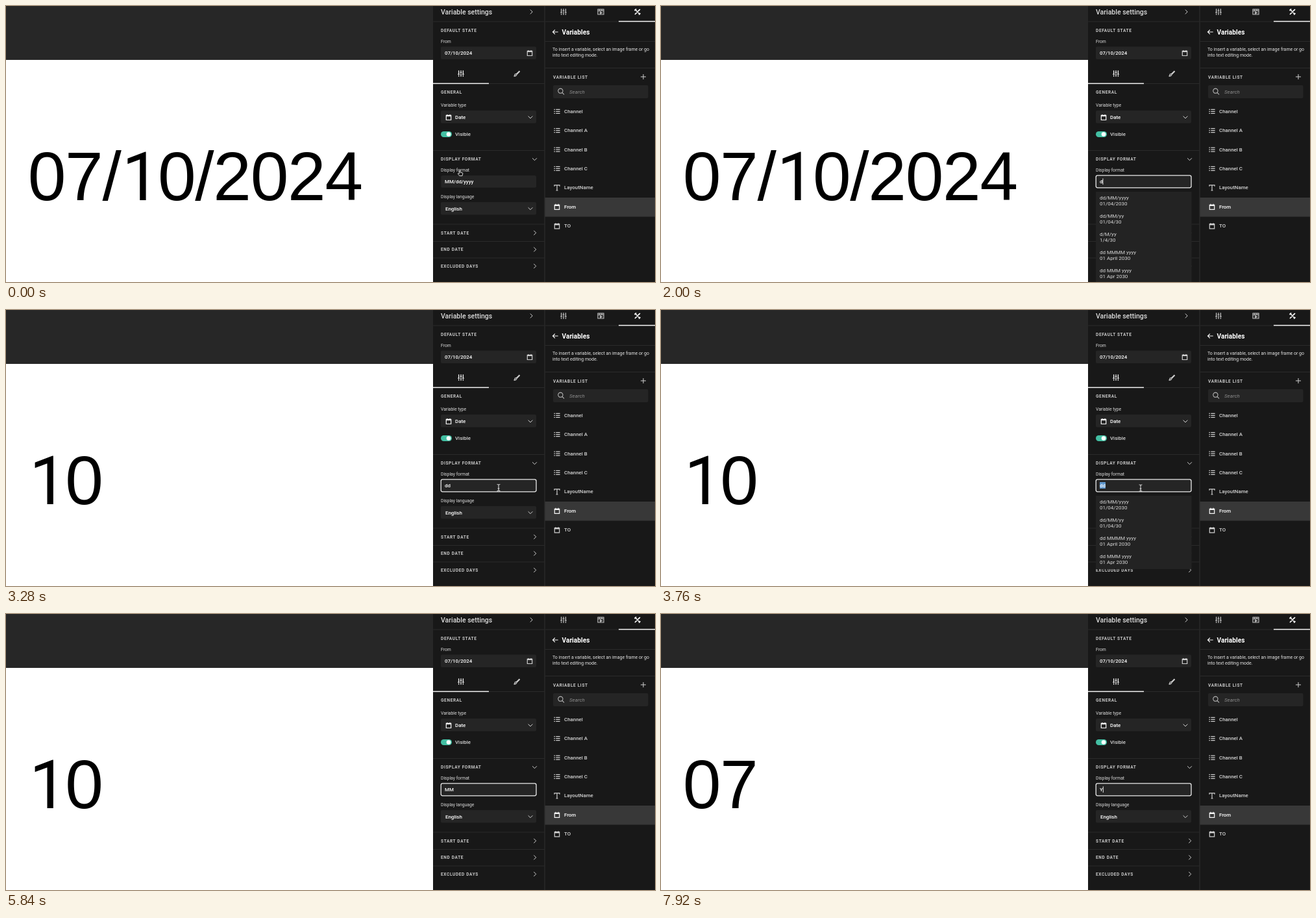
An HTML page that plays this animation: 1000x425 px, repeating every 8000 ms.

```html
<!DOCTYPE html>
<html lang="en">
<head>
<meta charset="utf-8">
<title>Variable settings</title>
<style>
html, body { margin: 0; width: 100%; height: 100%; overflow: hidden; background: #181818; }
svg { display: block; width: 100%; height: 100%; }
text { font: 8px Roboto, sans-serif; fill: #dcdcdc; white-space: pre; }
.head { font-size: 6.5px; font-weight: 700; letter-spacing: .65px; fill: #c8c8c8; }
.label { font-size: 6.8px; }
.note { font-size: 7px; fill: #e6e6e6; }
.item { font-size: 7.9px; font-weight: 500; fill: #d4d4d4; }
.value { font-size: 7.9px; font-weight: 500; fill: #fff; }
.title { font-size: 10.5px; font-weight: 500; }
.strong { font-size: 10.2px; font-weight: 700; fill: #fff; }
.hint { font-style: italic; fill: #8c8c8c; }
.page { font: 105.5px "Liberation Sans", Arial, sans-serif; letter-spacing: -1.3px; fill: #000; }
.one { font: 103.5px Roboto, sans-serif; }
</style>
</head>
<body>
<svg id="stage" viewBox="0 0 1000 425"></svg>
<script>
const LOOP = 8000, STEP = 80;
const stage = document.getElementById('stage');
let layer = stage;

function add(tag, attrs, content) {
  const el = document.createElementNS('http://www.w3.org/2000/svg', tag);
  for (const k in attrs) el.setAttribute(k, attrs[k]);
  if (content !== undefined) el.textContent = content;
  return layer.appendChild(el);
}
const rect = (x, y, width, height, fill, rx = 0) => add('rect', { x, y, width, height, fill, rx });
const text = (x, y, str, cls = '') => add('text', { x, y, class: cls }, str);
const icon = (x, y, d, stroke = '#d0d0d0', width = 1) =>
  add('path', { d, transform: `translate(${x} ${y})`, fill: 'none', stroke, 'stroke-width': width });
const group = () => { layer = stage; return layer = add('g', {}); };
const show = (el, on) => el.setAttribute('visibility', on ? 'visible' : 'hidden');

const right = (x, y) => icon(x, y, 'M-1.7-3.4 1.7 0-1.7 3.4', '#d0d0d0');
const down = (x, y) => icon(x, y, 'M-3.4-1.7 0 1.7 3.4-1.7', '#d0d0d0');
const sliders = (x, y, color) =>
  icon(x, y, 'M-3.4-4.8V.6M-3.4 2.4V4.8M0-4.8V-2.4M0-.6V4.8M3.4-4.8V.6M3.4 2.4V4.8M-4.8 1.2H-2M-1.4-1.6H1.4M2 1.2H4.8', color, 1.3);
const calendar = (x, y, color) =>
  icon(x, y, 'M-3.7-3.2H3.7V4H-3.7ZM-3.7-2H3.7M-2-4.6V-3M2-4.6V-3', color, 1.2);
const list = (x, y) =>
  icon(x, y, 'M-4.6-3H-3M-4.6 0H-3M-4.6 3H-3M-1.7-3H4.6M-1.7 0H4.6M-1.7 3H4.6', '#d0d0d0', 1.2);
const field = (y, h = 19.5) => rect(670, y, 147, h, '#252525', 2);

// Page
rect(0, 0, 658, 83, '#272727');
rect(0, 83, 658, 342, '#fff');
const page = text(33.7, 299, '', 'page');

// Settings panel
rect(658, 0, 342, 425, '#181818');
for (const y of [23.5, 119, 222, 335.5, 362, 387.5]) rect(658, y, 171.5, 1, '#2b2b2b');
text(670, 12.8, 'Variable settings', 'title');
right(809.5, 9);
text(670, 39.8, 'DEFAULT STATE', 'head');
text(670, 57, 'From', 'label');
field(62.5);
text(676, 75.2, '07/10/2024', 'value');
calendar(807, 72.5, '#d0d0d0');
sliders(701, 104, '#f0f0f0');
icon(787, 104, 'M4.2-4.2-1 1M4.8-3.5-.2 1.5M-1.2 .6Q-3.5 .8-3 2.8-3.4 3.8-4.5 4-1 4.6 0 1.8', '#d0d0d0', 1.2);
rect(658, 118.6, 86, 1.5, '#f2f2f2');
text(670, 134.6, 'GENERAL', 'head');
text(670, 155.2, 'Variable type', 'label');
field(161);
calendar(682, 171.5, '#f8f8f8');
text(692, 174, 'Date', 'value');
down(808, 171.3);
rect(670, 193, 17, 9, '#43bfa3', 4.5);
add('circle', { cx: 682, cy: 197.5, r: 3.3, fill: '#fff' });
text(692, 200.4, 'Visible', 'item');
text(670, 238, 'DISPLAY FORMAT', 'head');
down(814.5, 236);
text(670, 255, 'Display format', 'label');
text(670, 296, 'Display language', 'label');
field(302);
text(677, 314.8, 'English', 'value');
down(808, 312);
['START DATE', 'END DATE', 'EXCLUDED DAYS'].forEach((name, i) => {
  text(670, 351.7 + i * 25.6, name, 'head');
  right(815, 349.3 + i * 25.6);
});

// Variables panel
rect(829.5, 0, 1, 425, '#303030');
for (const y of [23.5, 54, 95]) rect(830.5, y, 169.5, 1, '#2b2b2b');
sliders(859, 9, '#c0c0c0');
icon(916.5, 9, 'M-4.5-3.8H4.5V4H-4.5ZM-4.5-1.5H4.5M-2-3.8-1.4-1.5M1.2-3.8 1.8-1.5M-1 0 1.8 1.4-1 2.8Z', '#c0c0c0', 1.2);
icon(973, 9, 'M-4-4 4 4M4-4-4 4M-4.5-1.8-1.8-4.5M2 4.4 4.4 2M1.8-3.2 3.2-1.8', '#fff', 1.7);
rect(944, 22.9, 56, 1.5, '#f2f2f2');
icon(846.5, 40, 'M4.2 0H-3.8M-.6-3.4-4 0-.6 3.4', '#f4f4f4', 1.2);
text(856.5, 43.5, 'Variables', 'strong');
text(842, 69, 'To insert a variable, select an image frame or go', 'note');
text(842, 77.5, 'into text editing mode.', 'note');
text(843, 111.6, 'VARIABLE LIST', 'head');
icon(982, 109, 'M-4 0H4M0-4V4', '#d0d0d0');
rect(843, 122, 146.5, 20, '#252525', 2);
icon(855, 131.5, 'M3-.8A3.6 3.6 0 1 1-4.2-.8 3.6 3.6 0 1 1 3-.8M2 1.8 5 4.8', '#b8b8b8', 1.1);
text(868, 134.8, 'Search', 'hint');
rect(830.5, 295, 169.5, 29.5, '#383838');
['Channel', 'Channel A', 'Channel B', 'Channel C', 'LayoutName', 'From', 'TO'].forEach((name, i) => {
  const y = 162.3 + i * 29.37;
  if (i < 4) list(849, y);
  else if (i === 4) icon(849, y, 'M-4-2V-4H4V-2M0-4V4.2M-1.5 4.2H1.5', '#d0d0d0', 1.2);
  else calendar(849, y + .3, i === 5 ? '#f8f8f8' : '#d0d0d0');
  text(860, y + 2.7, name, i === 5 ? 'value' : 'item');
});

// Format input
const input = add('rect', { x: 670.2, y: 260.9, width: 146.8, height: 18.9, rx: 2.5, fill: '#252525', 'stroke-width': 1.3 });
const mark = rect(676, 265, 0, 10, '#5f97cd');
const typed = text(676, 273, '', 'value');
const caret = rect(0, 265.5, .9, 9.5, '#fff');

// Suggestions: [format, example]
const formats = [
  ['MM/dd/yyyy', '04/01/2030'], ['MM/dd/yy', '04/01/30'], ['M/d/yy', '4/1/30'],
  ['MMMM d, yyyy', 'April 1, 2030'], ['MMM d, yyyy', 'Apr 1, 2030'],
  ['dd/MM/yyyy', '01/04/2030'], ['dd/MM/yy', '01/04/30'], ['d/M/yy', '1/4/30'],
  ['dd MMMM yyyy', '01 April 2030'], ['dd MMM yyyy', '01 Apr 2030']
];
const menu = group();
const cursors = { hand: group(), beam: null };
add('path', {
  d: 'M-1.6 1V-3.6Q-.8-5 0-3.6V-.8L3.2-.2Q4-.1 3.8 1L3 4.5H-1.2L-3.8 1.2Q-3.4 0-1.6 1Z',
  fill: '#181818', stroke: '#e8e8e8', 'stroke-width': .9
});
cursors.beam = group();
icon(0, 0, 'M-2.4-5Q0-5 0-3.8 0-5 2.4-5M0-4V4M-2.4 5Q0 5 0 3.8 0 5 2.4 5M-1.3 1.4H1.3', '#d8d8d8', 1.1);

// [start, text, selection start (-1 = none), menu open, caret on]
const edits = [
  [0, 'MM/dd/yyyy', -1, 0, 0], [560, 'MM/dd/yyyy', -1, 1, 1],
  [720, 'MM/dd/yyyy', 6, 1, 0], [1120, 'MM/dd/yyyy', 0, 1, 0],
  [2000, 'd', -1, 1, 1], [2160, 'dd', -1, 1, 1], [2400, 'dd', -1, 0, 0],
  [3680, 'dd', -1, 1, 1], [3760, 'dd', 0, 1, 0],
  [4800, 'M', -1, 1, 1], [5040, 'MM', -1, 1, 1], [5520, 'MM', -1, 1, 0], [5840, 'MM', -1, 0, 0],
  [6880, 'MM', -1, 1, 1], [7040, 'MM', 0, 1, 0], [7840, 'Y', -1, 1, 1]
];

// [appear, arrive, vanish, x0, y0, x1, y1]
const moves = [
  [0, 480, 1360, 700, 257, 748, 271.3],
  [1360, 1360, 1440, 748, 269, 748, 269],
  [3280, 3520, 4800, 759, 273.5, 739, 274],
  [6640, 6800, 7280, 752, 272, 740.5, 273.5]
];

// The digit 1 is set in Roboto, whose form has no foot
const pageMarkup = date =>
  date.replace(/1(.*)/, '<tspan class="one" dx="2.2">1</tspan><tspan dx="-1.6">$1</tspan>');

function drawMenu(open, str) {
  const items = open ? formats.filter(f => f[0].startsWith(str)) : [];
  menu.replaceChildren();
  if (!items.length) return;
  layer = menu;
  rect(670, 286, 147.5, items.length * 28.25, '#232323');
  items.forEach((pair, i) => pair.forEach((line, j) => text(676, 297.6 + i * 28.2 + j * 9, line)));
}

function drawCursor(t) {
  const move = moves.find(m => t >= m[0] && t < m[2]);
  let kind = '';
  if (move) {
    const [start, end, , x0, y0, x1, y1] = move;
    const p = end > start ? Math.min(1, (t - start) / (end - start)) : 1;
    const k = p * p * (3 - 2 * p), x = x0 + (x1 - x0) * k, y = y0 + (y1 - y0) * k;
    kind = y < 261 ? 'hand' : 'beam';
    cursors[kind].setAttribute('transform', `translate(${x} ${y})`);
  }
  for (const name in cursors) show(cursors[name], name === kind);
}

let last = -1;
function draw(now) {
  requestAnimationFrame(draw);
  const t = Math.floor(now % LOOP / STEP) * STEP;
  if (t === last) return;
  last = t;
  const [, str, from, open, blink] = edits.findLast(e => t >= e[0]);
  page.innerHTML = pageMarkup(t < 2480 ? '07/10/2024' : t < 5920 ? '10' : '07');
  input.setAttribute('stroke', t < 560 ? 'none' : '#ececec');
  typed.textContent = str;
  const width = typed.getComputedTextLength();
  const skip = from > 0 ? typed.getSubStringLength(0, from) : 0;
  mark.setAttribute('x', 676 + skip);
  mark.setAttribute('width', from < 0 ? 0 : width - skip);
  caret.setAttribute('x', 676 + width);
  show(caret, blink);
  drawMenu(open, str);
  drawCursor(t);
}
draw(performance.now());
</script>
</body>
</html>
```
